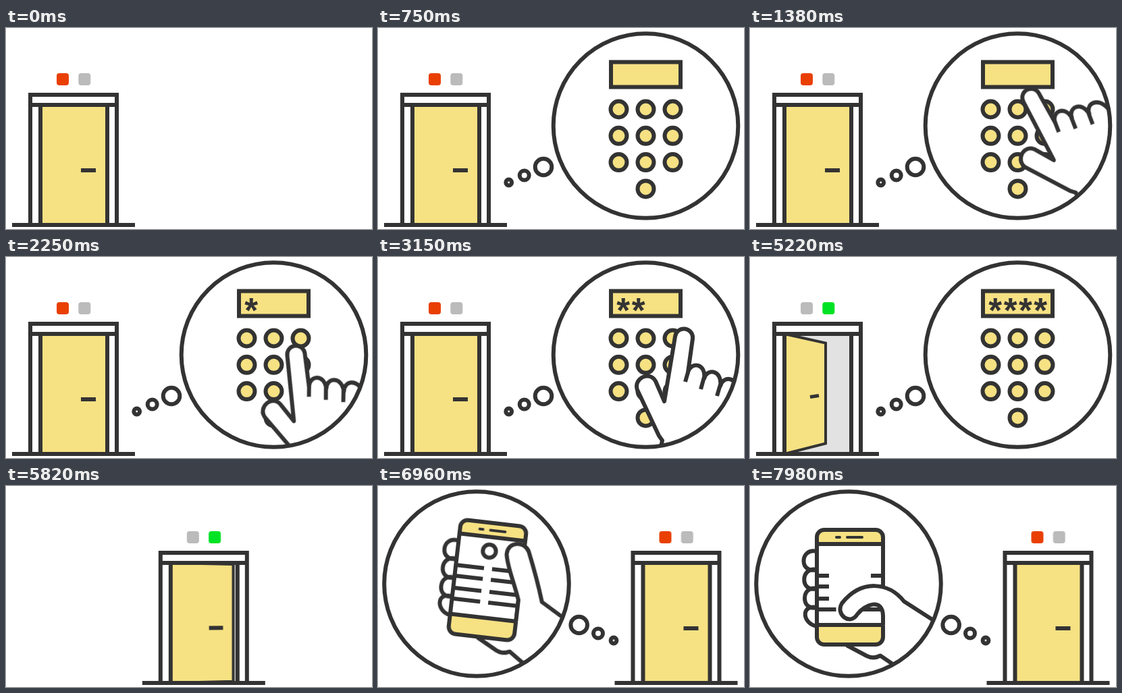
An HTML page that plays this animation: 542x298 px, repeating every 8000 ms.

```html
<!DOCTYPE html>
<html lang="en">
<head>
<meta charset="utf-8">
<title>Door access</title>
<style>
html, body { margin: 0; height: 100%; overflow: hidden; background: #fff; }
svg { display: block; width: 100vw; height: 100vh; }
.line { fill: none; stroke: #333; stroke-width: 6; }
.white { fill: #fff; }
.gold { fill: #f6e183; }
.round { stroke-linejoin: round; }
text { font: bold 51px "Liberation Sans", Arial, sans-serif; fill: #333; text-anchor: middle; }

/* Every part shares one 8 s clock. */
.anim { animation: 8s cubic-bezier(.37, 0, .63, 1) infinite both; }

.scene { animation-name: pan; }
@keyframes pan {
  0%, 67.49% { transform: none; }
  77.24%, 100% { transform: translateX(341.5px); }
}

.lamp-left { animation-name: lampLeft; animation-timing-function: step-end; }
.lamp-right { animation-name: lampRight; animation-timing-function: step-end; }
@keyframes lampLeft { 0%, 77% { fill: #e93f03; } 51% { fill: #bbb; } }
@keyframes lampRight { 0%, 77% { fill: #bbb; } 51% { fill: #00e324; } }

.door { animation-name: door; stroke-width: 4; }
@keyframes door {
  0%, 52.5%, 74.8%, 100% { d: path("M51 114L149 114L149 292L51 292Z"); }
  60.75%, 66.6% { d: path("M51 114L112 127.5L112 276.5L51 292Z"); }
}
.handle { animation-name: handle; }
@keyframes handle {
  0%, 52.5%, 74.8%, 100% { d: path("M111 211L133 211"); stroke-width: 6px; }
  60.75%, 66.6% { d: path("M89 207.5L102 205.5"); stroke-width: 5px; }
}

.bubble-code { animation-name: bubbleCode; transform-origin: 258px 200px; }
.bubble-phone { animation-name: bubblePhone; transform-origin: 285px 200px; }
@keyframes bubbleCode {
  0%, 3% { transform: scale(0); animation-timing-function: cubic-bezier(.61, 1, .88, 1); }
  9%, 65.5% { transform: none; }
  68.5%, 100% { transform: scale(0); }
}
@keyframes bubblePhone {
  0%, 77.25% { transform: scale(0); animation-timing-function: cubic-bezier(.61, 1, .88, 1); }
  82.5%, 100% { transform: none; }
}

.dots circle { transform-box: fill-box; transform-origin: center; animation-delay: calc(var(--i) * 70ms); }
.dots-code circle { animation-name: dotsCode; }
.dots-phone circle { animation-name: dotsPhone; }
@keyframes dotsCode {
  0%, .5% { transform: scale(0); }
  2.5%, 65.5% { transform: none; }
  67.5%, 100% { transform: scale(0); }
}
@keyframes dotsPhone {
  0%, 75.5% { transform: scale(0); }
  77.5%, 100% { transform: none; }
}

.star { animation-timing-function: step-end; }
@keyframes star1 { 0% { opacity: 0; } 21.25%, 100% { opacity: 1; } }
@keyframes star2 { 0% { opacity: 0; } 31%, 100% { opacity: 1; } }
@keyframes star3 { 0% { opacity: 0; } 41.5%, 100% { opacity: 1; } }
@keyframes star4 { 0% { opacity: 0; } 47.5%, 100% { opacity: 1; } }

.hand { animation-name: press; }
@keyframes press {
  0%, 10.6% { transform: translate(520px, 400px) rotate(-37deg); }
  17.25% { transform: translate(450px, 196px) rotate(-37deg); }
  20.6%, 21.5% { transform: translate(428px, 213px) rotate(-37deg); }
  24% { transform: translate(432px, 205px) rotate(-28deg); }
  30.5%, 31.5% { transform: translate(424px, 259px) rotate(-10deg); }
  39.4% { transform: translate(424px, 214px) rotate(0deg); }
  41.2%, 42% { transform: translate(410px, 217px) rotate(0deg); }
  47%, 48% { transform: translate(407px, 295px) rotate(0deg); }
  53%, 100% { transform: translate(407px, 420px) rotate(0deg); }
}

.phone { animation-name: raise; }
@keyframes raise {
  0%, 81.5% { transform: translate(230px, 400px) rotate(20deg); }
  87% { transform: translate(162px, 139.5px) rotate(6.6deg); }
  91%, 100% { transform: translate(148px, 150px) rotate(0deg); }
}
.knob { animation-name: drag; }
@keyframes drag {
  0%, 93% { transform: translate(-2px, -43px); }
  99.9%, 100% { transform: translate(-1px, 31px); }
}
.row { animation-name: part; animation-delay: calc(var(--i) * 118ms); }
@keyframes part {
  0%, 94.1% { d: path("M-49 0L-7 0M49 0L5 0"); }
  96.4%, 100% { d: path("M-49 0L-31 0M49 0L31 0"); }
}
.thumb { animation-name: thumb; }
@keyframes thumb {
  0%, 89% { d: path("M150 61L84 23C76 -1 66 -26 56 -49C48 -64 23 -61 24 -41C27 -23 38 -5 49 24L49 56"); }
  93% { d: path("M150 64L85 22C72 -20 40 -57 2 -56C-20 -55 -16 -29 -1 -29C20 -28 42 0 49 35L49 56"); }
  99.7%, 100% { d: path("M150 66L80 21C57 -8 17 -12 -12 24C-22 40 0 58 11 40C22 26 48 15 49 42L49 56"); }
}
</style>
</head>
<body>
<svg viewBox="0 0 542 298">
  <defs>
    <clipPath id="clipCode"><circle cx="396.5" cy="145" r="137"/></clipPath>
    <clipPath id="clipPhone"><circle cx="146" cy="145" r="137"/></clipPath>
  </defs>

  <g class="scene anim">
    <rect class="lamp-left anim" x="75" y="67" width="18" height="18" rx="4"/>
    <rect class="lamp-right anim" x="107.3" y="67" width="18" height="18" rx="4"/>
    <rect x="51" y="114" width="99" height="178" fill="#e2e2e2"/>
    <path class="door line gold anim" d="M51 114L149 114L149 292L51 292Z"/>
    <path class="handle line anim" d="M111 211L133 211"/>
    <path class="line" d="M36 295V99H164V295M33 114H167M51 114V295M150 114V295M9 292H191"/>
  </g>

  <g class="dots dots-code line">
    <circle class="anim" style="--i:0" cx="193.7" cy="229" r="4.4"/>
    <circle class="anim" style="--i:1" cx="216.7" cy="218.5" r="7"/>
    <circle class="anim" style="--i:2" cx="245" cy="206" r="12.3"/>
  </g>
  <g class="bubble-code anim">
    <circle class="white" cx="396.5" cy="145" r="137"/>
    <g clip-path="url(#clipCode)">
      <rect class="line gold" x="345" y="50.5" width="103" height="37"/>
      <g id="stars"></g>
      <g id="keys"></g>
      <g class="hand anim">
        <path class="line white round" d="M-8 200L-6 72L-3 58L-8 51L-40 -17C-46 -34 -22 -46 -13 -30L0 0L16 -96A13 13 0 0 1 42 -93L35 -43C40 -60 62 -56 59 -34C64 -50 86 -46 83 -23C88 -39 108 -36 110 -14L140 80V200Z"/>
        <path class="line" d="M35 -43L31 -29M59 -36L54 -18M83 -25L78 -8"/>
      </g>
    </g>
    <circle class="line" cx="396.5" cy="145" r="136.8"/>
  </g>

  <g class="dots dots-phone line">
    <circle class="anim" style="--i:0" cx="349" cy="229" r="4.4"/>
    <circle class="anim" style="--i:1" cx="326" cy="218.5" r="7"/>
    <circle class="anim" style="--i:2" cx="297.7" cy="206" r="12.3"/>
  </g>
  <g class="bubble-phone anim">
    <circle class="white" cx="146" cy="145" r="137"/>
    <g clip-path="url(#clipPhone)">
      <g class="phone anim">
        <path class="line round" d="M-49 -53c-26 -6 -26 34 0 27c-25 -5 -25 35 0 28c-24 -5 -24 34 0 28c-24 -5 -22 24 0 28"/>
        <path class="line round" d="M-5 86L25 102Q35 107 45 101.5L113 148"/>
        <rect class="gold" x="-49" y="-85" width="98" height="170" rx="11"/>
        <path class="line white" d="M-49 -64H49V56H-49Z"/>
        <rect class="line" x="-49" y="-85" width="98" height="170" rx="11"/>
        <path class="line" stroke-linecap="round" style="stroke-width:4" d="M-20 -74h5M-4 -74h22"/>
        <g id="rows"></g>
        <circle class="knob line white anim" r="9.7"/>
        <path class="thumb line white round anim" d="M150 61L84 23C76 -1 66 -26 56 -49C48 -64 23 -61 24 -41C27 -23 38 -5 49 24L49 56"/>
      </g>
    </g>
    <circle class="line" cx="146" cy="145" r="136.8"/>
  </g>
</svg>
<script>
const fill = (id, items, draw) => {
  document.getElementById(id).innerHTML = items.map(draw).join("");
};

fill("keys", [0, 1, 2, 3, 4, 5, 6, 7, 8, 10], n =>
  `<circle class="line gold" cx="${356.5 + n % 3 * 40}" cy="${120.5 + Math.floor(n / 3) * 39.3}" r="12"/>`);

fill("stars", [1, 2, 3, 4], n =>
  `<text class="star anim" style="animation-name:star${n}" x="${341 + n * 22.3}" y="97">*</text>`);

fill("rows", [-17, -1, 17, 33], (y, i) =>
  `<g transform="translate(0 ${y})"><path class="row line anim" style="--i:${i}" d="M-49 0L-7 0M49 0L5 0"/></g>`);
</script>
</body>
</html>
```
